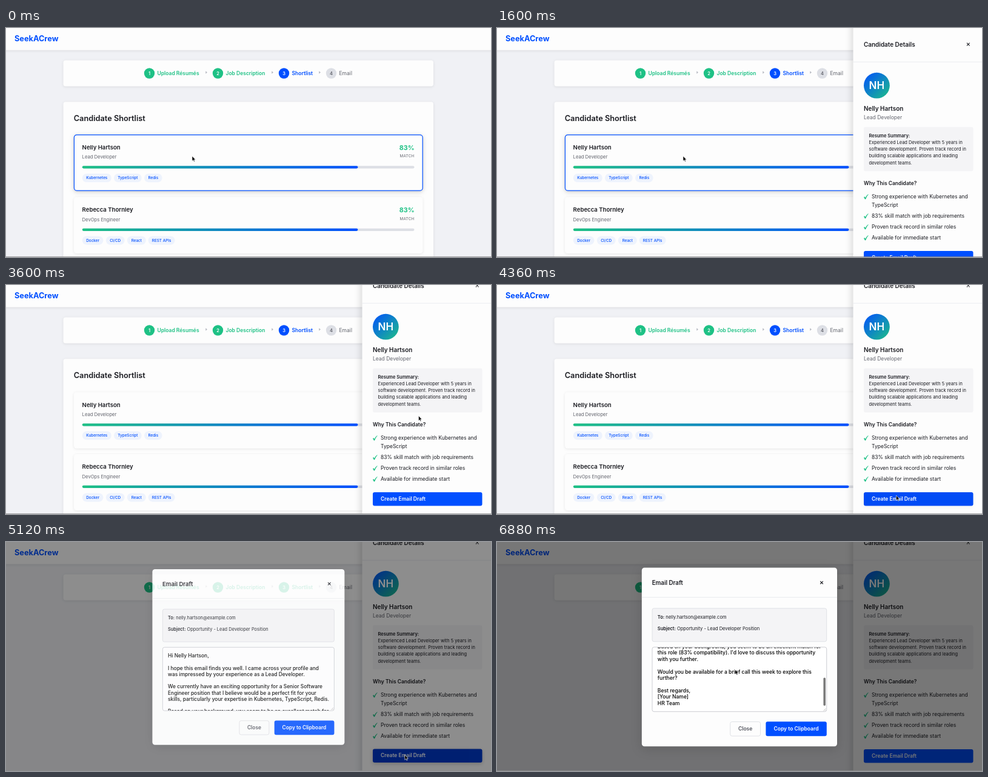
Animation, 800 px wide and 379 px high, one loop 6920 ms. Source, as an HTML page:

```html
<!DOCTYPE html>
<html lang="en">
<head>
<meta charset="utf-8">
<title>Candidate shortlist</title>
<style>
html, body { margin: 0; width: 100%; height: 100%; overflow: hidden; background: #f0f1f5; }
svg { display: block; width: 100vw; height: 100vh; font-family: Inter, "Liberation Sans", sans-serif; }
text { white-space: pre; }
.soft { filter: drop-shadow(0 1px 2px rgba(0,0,0,.09)); }
.lift { filter: drop-shadow(0 2px 4px rgba(0,0,0,.13)); }
.side { filter: drop-shadow(-2px 0 6px rgba(0,0,0,.16)); }
.deep { filter: drop-shadow(0 4px 9px rgba(0,0,0,.14)); }
</style>
</head>
<body>
<svg id="stage" viewBox="0 0 800 379"></svg>
<script>
const LOOP = 6920;
const BLUE = '#004fff', GREEN = '#1ec185', INK = '#1a1b21', MUTED = '#63656e', LINE = '#dddfe5', WHITE = '#fdfdfd';
const PERSON = 'Nelly Hartson', ROLE = 'Lead Developer';

// y is the middle of the capitals
const text = (x, y, size, str, { w = 400, fill = INK, at = 'start', more = '' } = {}) =>
  `<text x="${x}" y="${(y + size * .364).toFixed(2)}" font-size="${size}" font-weight="${w}" fill="${fill}" text-anchor="${at}" ${more}>${str}</text>`;
const box = (x, y, w, h, r, fill, more = '') =>
  `<rect x="${x}" y="${y}" width="${w}" height="${h}" rx="${r}" fill="${fill}" ${more}/>`;
const cross = (x, y) =>
  `<path d="M${x - 2.3} ${y - 2.3}l4.6 4.6m0-4.6l-4.6 4.6" stroke="${INK}" stroke-width="1.1"/>`;
const check = (x, y) =>
  `<path transform="translate(${x} ${y})" d="M0 .8L1.5-.2Q2.2 .7 2.6 1.8Q4.3-2 7.2-4.2L7.6-3.8Q4.7-.6 3.2 3.9L2 4.2Z" fill="${GREEN}"/>`;
const strong = str => `<tspan font-weight="600">${str}</tspan>`;

function stepper() {
  const steps = [[236.5, 'Upload Résumés'], [349.5, 'Job Description'], [458.5, 'Shortlist'], [536.5, 'Email']];
  const arrows = [329.3, 438.3, 516.3].map(x => `<path d="M${x} 71.3l2.6 2.2l-2.6 2.2z" fill="#b3b6be"/>`).join('');
  return box(94.5, 53.5, 610.5, 43, 4, WHITE, 'class="soft"') + arrows + steps.map(([x, label], i) => {
    const last = i === 3;
    const tone = last ? LINE : i === 2 ? BLUE : GREEN;
    return `<g id="step${i + 1}" fill="${tone}"><circle cx="${x}" cy="75" r="8.7"/>`
      + text(x, 75, 7.44, i + 1, { w: 600, fill: last ? MUTED : '#fff', at: 'middle' })
      + text(x + 13, 75, 8.5, label, { w: last ? 400 : 600, fill: last ? MUTED : 'inherit' }) + '</g>';
  }).join('');
}

// tags: [left, width, label]
function card(y, id, name, role, tags) {
  return `<g id="${id}" transform="translate(0 ${y})">`
    + box(112, 0, 575.5, 93, 4.5, WHITE, 'class="soft"')
    + box(112.4, .4, 574.8, 92.2, 4.3, WHITE, `class="lift ring" stroke="${BLUE}" stroke-width="1.2" opacity="0"`)
    + text(125.6, 20.7, 9.6, name, { w: 600 })
    + text(125.6, 36.9, 7.65, role, { fill: MUTED })
    + text(661.3, 21.4, 10.8, '83%', { w: 700, fill: GREEN, at: 'middle' })
    + text(661.5, 35.2, 6.375, 'MATCH', { fill: MUTED, at: 'middle', more: 'letter-spacing=".27"' })
    + box(125.8, 51.7, 547.7, 4.2, 2.1, LINE) + box(125.8, 51.7, 454.6, 4.2, 2.1, 'url(#bar)')
    + tags.map(([x, w, s]) => box(x, 64.4, w, 14.4, 7.2, '#eef3fd')
      + text(x + w / 2, 71.6, 6.375, s, { w: 500, fill: BLUE, at: 'middle' })).join('') + '</g>';
}

function panel() {
  const summary = ['Experienced Lead Developer with 5 years in', 'software development. Proven track record in',
    'building scalable applications and leading', 'development teams.'];
  const reasons = [[279.3, 'Strong experience with Kubernetes and'], [293.3, 'TypeScript'],
    [311.2, '83% skill match with job requirements'], [329.2, 'Proven track record in similar roles'],
    [347.3, 'Available for immediate start']];
  return box(587.5, -10, 230, 400, 0, WHITE, 'class="side"') + '<g id="details">'
    + text(605, 27.2, 9.945, 'Candidate Details', { w: 600 }) + cross(777.3, 27)
    + box(587.5, 55.8, 212.5, .6, 0, LINE)
    + '<circle cx="626.4" cy="95.2" r="21.4" fill="url(#face)"/>'
    + text(626.4, 95.2, 17, 'NH', { w: 600, fill: '#fff', at: 'middle' })
    + text(605, 133, 9.945, PERSON, { w: 600 })
    + text(605, 148.3, 8.5, ROLE, { fill: MUTED })
    + box(605, 163.7, 180.5, 73.2, 3, '#f4f4f6')
    + text(613.5, 178, 7.44, 'Resume Summary:', { w: 600 })
    + summary.map((s, i) => text(613.5, 189.3 + i * 11.2, 7.44, s)).join('')
    + text(605, 257, 8.5, 'Why This Candidate?', { w: 600 })
    + reasons.map(([y, s], i) => text(618, y, 8.5, s) + (i === 1 ? '' : check(605, y))).join('')
    + `<g id="create">${box(605, 369, 180.5, 22.6, 3, BLUE, 'id="createBox"')}`
    + text(618, 379.6, 8.5, 'Create Email Draft', { w: 600, fill: '#fff' }) + '</g></g>'
    + box(797.4, 0, 3.2, 355, 1.6, '#7b7b7b', 'id="panelThumb"');
}

function modal() {
  const letter = [`Hi ${PERSON},`, '',
    'I hope this email finds you well. I came across your profile and',
    'was impressed by your experience as a Lead Developer.', '',
    'We currently have an exciting opportunity for a Senior Software',
    'Engineer position that I believe would be a perfect fit for your',
    'skills, particularly your expertise in Kubernetes, TypeScript, Redis.', '',
    'Based on your background, you seem to be an excellent match for',
    "this role (83% compatibility). I'd love to discuss this opportunity",
    'with you further.', '',
    'Would you be available for a brief call this week to explore this', 'further?', '',
    'Best regards,', '[Your Name]', 'HR Team'];
  const border = 'stroke="#d5d7dd" stroke-width=".7"';
  return box(238.8, 42.5, 322.2, 295.7, 4.5, WHITE, 'class="deep"')
    + text(255.7, 67.2, 9.75, 'Email Draft', { w: 600 }) + cross(535.5, 67.2)
    + box(238.8, 91.3, 322.2, .6, 0, LINE)
    + box(256, 109.8, 287.7, 55, 3, '#f4f4f6', border)
    + text(264.8, 124.6, 7.53, strong('To:') + ' nelly.hartson@example.com')
    + text(264.8, 143.1, 7.53, strong('Subject:') + ' Opportunity - Lead Developer Position')
    + box(256, 174, 287.7, 106.7, 3, '#fff', 'stroke="#b9bbc2" stroke-width=".7"')
    + '<g clip-path="url(#area)"><g id="letter">'
    + letter.map((s, i) => text(264.8, 188 + i * 10.42, 8.55, s, { w: 500, fill: '#000' })).join('') + '</g></g>'
    + box(538.4, 0, 3.6, 46.5, 1.8, '#7b7b7b', 'id="areaThumb"')
    + '<path d="M538.5 279.5l4-4m-1.6 4l1.6-1.6" stroke="#888" stroke-width=".5"/>'
    + box(384.7, 297.5, 49.8, 23.6, 3, WHITE, border)
    + text(409.6, 309.2, 8.5, 'Close', { w: 600, fill: '#53555e', at: 'middle' })
    + box(443.4, 297.3, 100.4, 24, 3, BLUE)
    + text(493.5, 309.2, 8.5, 'Copy to Clipboard', { w: 600, fill: '#fff', at: 'middle' });
}

stage.innerHTML = `<defs>
  <linearGradient id="bar"><stop stop-color="${GREEN}"/><stop offset="1" stop-color="${BLUE}"/></linearGradient>
  <linearGradient id="face" x2="1" y2="1"><stop stop-color="${BLUE}"/><stop offset="1" stop-color="${GREEN}"/></linearGradient>
  <clipPath id="area"><rect x="256.4" y="174.4" width="287" height="106"/></clipPath></defs>`
  + box(0, 0, 800, 379, 0, '#f0f1f5')
  + box(-5, -5, 810, 41.6, 0, WHITE, 'class="soft"')
  + text(14, 17.3, 12.75, 'SeekACrew', { w: 700, fill: BLUE })
  + stepper()
  + '<g id="list">' + box(94.5, 122.2, 610.5, 280, 4, WHITE, 'class="soft"')
  + text(111.7, 149.5, 12.75, 'Candidate Shortlist', { w: 600 })
  + card(177.5, 'first', PERSON, ROLE, [[125.8, 48, 'Kubernetes'], [178, 45.7, 'TypeScript'], [228, 29.6, 'Redis']])
  + card(280, 'second', 'Rebecca Thornley', 'DevOps Engineer',
    [[125.8, 34.6, 'Docker'], [164.8, 30.8, 'CI/CD'], [199.8, 31, 'React'], [234.6, 44, 'REST APIs']])
  + '</g><g id="panel">' + panel() + '</g>'
  + '<g id="overlay">' + box(0, 0, 800, 379, 0, 'rgba(0,0,0,.53)') + '<g id="modal">' + modal() + '</g></g>'
  + box(0, 378.2, 800, .8, 0, '#8c8c8e')
  + '<path id="pointer" d="M0 0V8.2L1.9 6.5L3.1 9.2L4.4 8.6L3.2 6H5.6Z" fill="#000" stroke="#fff" stroke-width=".6"/>';

const el = id => document.getElementById(id);
const set = (id, key, value) => el(id).setAttribute(key, value);
const move = (id, x, y) => set(id, 'transform', `translate(${x} ${y})`);
const mix = (a, b, p) => a + (b - a) * p;
const smooth = p => p * p * (3 - 2 * p);

// cubic-bezier(.25, .1, .25, 1)
function ease(p) {
  if (p <= 0 || p >= 1) return p;
  const curve = (u, a, b) => 3 * u * (1 - u) ** 2 * a + 3 * u * u * (1 - u) * b + u ** 3;
  let lo = 0, hi = 1;
  for (let i = 0; i < 20; i++) {
    const mid = (lo + hi) / 2;
    if (curve(mid, .25, .25) < p) lo = mid; else hi = mid;
  }
  return curve(lo, .1, 1);
}
const ramp = (t, start, end, f = smooth) => f(Math.min(1, Math.max(0, (t - start) / (end - start))));

const stops = [[307, 212], [680.5, 216.5], [657.8, 352.3], [392.5, 211]];
const trips = [[1620, 2160], [3850, 4420], [5780, 6260]];

function draw(t) {
  let [x, y] = stops[0];
  trips.forEach(([a, b], i) => {
    if (t >= a) [x, y] = [0, 1].map(k => mix(stops[i][k], stops[i + 1][k], ramp(t, a, b)));
  });
  move('pointer', x, y);

  const hover = 1 - ramp(t, 1960, 2160, ease);
  move('first', 0, 177.5 - hover);
  el('first').querySelector('.ring').setAttribute('opacity', hover);

  move('panel', 245 * (1 - ramp(t, 1000, 1300, ease)), 0);
  const scroll = 26 * ramp(t, 2560, 3000);
  move('details', 0, -scroll);
  move('panelThumb', 0, scroll * .93);
  set('panelThumb', 'opacity', ramp(t, 2540, 2600) - ramp(t, 3300, 3500));

  const press = ramp(t, 4330, 4530, ease) - ramp(t, 5800, 6000, ease);
  move('create', 0, -.5 * press);
  set('createBox', 'fill', `rgb(0,${mix(79, 57, press)},${mix(255, 204, press)})`);
  el('createBox').style.filter = `drop-shadow(0 2px 3px rgba(0,0,0,${.2 * press}))`;

  const sent = t >= 4920;
  set('list', 'visibility', sent ? 'hidden' : 'visible');
  set('step3', 'fill', sent ? GREEN : BLUE);

  const open = ramp(t, 4960, 5260, ease), zoom = mix(.9, 1, open);
  set('overlay', 'opacity', open);
  set('modal', 'transform', `translate(400 190.3) scale(${zoom}) translate(-400 -190.3)`);
  const read = ramp(t, 6340, 6820);
  move('letter', 0, -108.9 * read);
  move('areaThumb', 0, mix(176, 224.5, read));
  set('areaThumb', 'opacity', ramp(t, 6320, 6380));
}

function tick() {
  draw(performance.now() % LOOP);
  requestAnimationFrame(tick);
}
tick();
</script>
</body>
</html>
```
